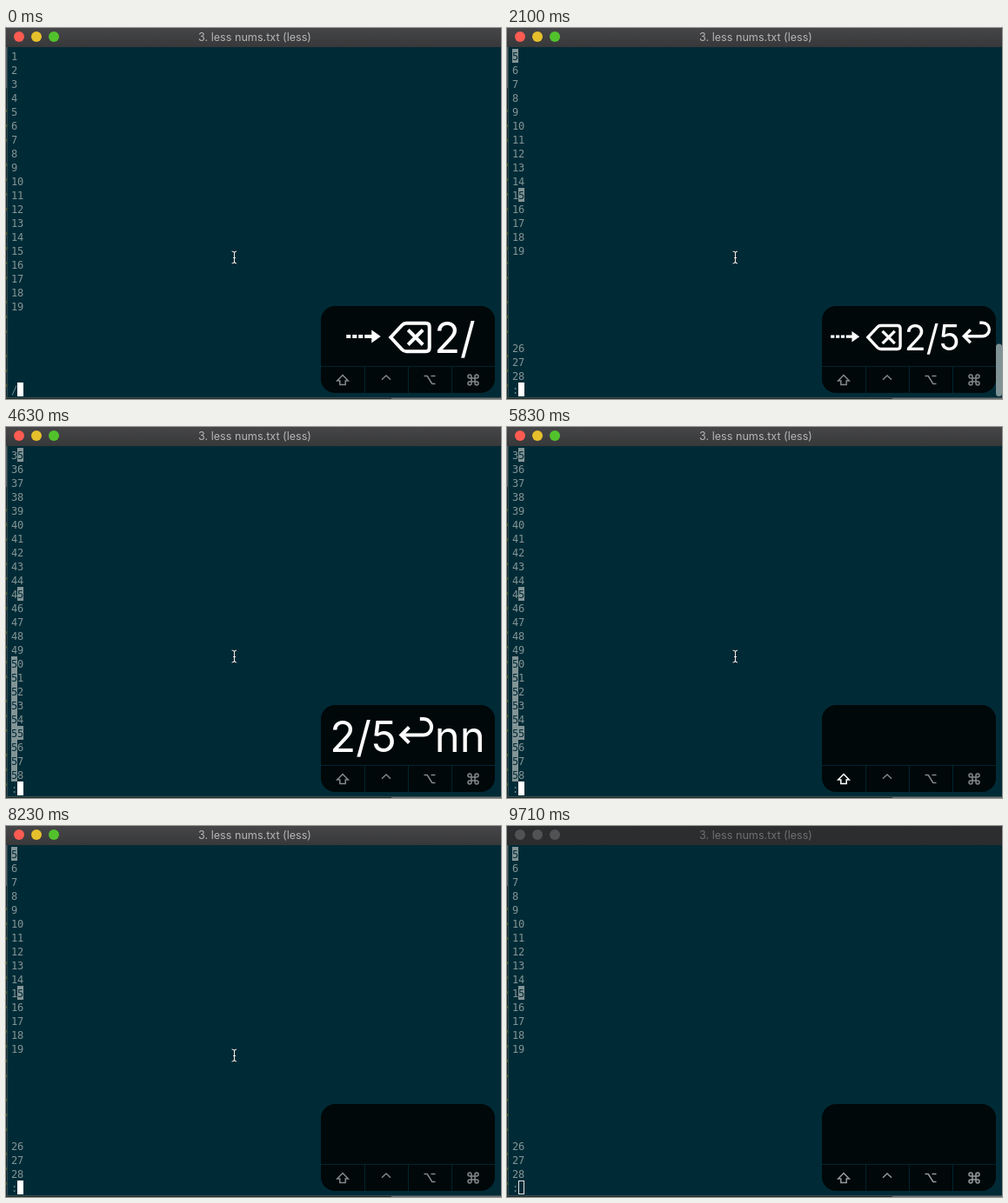
These frames come from a looping animation (569 by 427 pixels, 9810 ms). An HTML page with a canvas:

```html
<!DOCTYPE html>
<html lang="en">
<head>
<meta charset="utf-8">
<title>less nums.txt</title>
<style>
  html, body { margin: 0; width: 100%; height: 100%; overflow: hidden; background: #002b36; }
  canvas { display: block; }
</style>
</head>
<body>
<canvas id="stage" width="569" height="427"></canvas>
<script>
const ctx = document.getElementById('stage').getContext('2d');
const LOOP = 9810, BG = '#002b36', FG = '#839496';
const CELL_W = 7, CELL_H = 16, LEFT = 6, TOP = 24, ROWS = 24;
const KEYS_WIDTH = 192;

// start time, first line shown, prompt, pressed keys ('>' tab, '<' delete, '~' return), shift held
const steps = [
  [0, 1, '/', '><2/', false],
  [1350, 1, '/5', '><2/5', false],
  [2100, 5, ':', '><2/5~', false],
  [3440, 15, ':', '<2/5~n', false],
  [4630, 35, ':', '2/5~nn', false],
  [5830, 35, ':', '', true],
  [6130, 15, ':', 'N', true],
  [7030, 5, ':', 'NN', true],
  [8230, 5, ':', '', false],
];
const pointerStops = [[0, 262.5, 264], [8820, 278.5, 264], [8960, 466.5, 320], [9110, 555.5, 409], [9250, 540.5, 421], [9400, -50, -50]];
const latest = (list, t) => list.filter(item => item[0] <= t).pop();

const modifiers = [
  'M0-5.5L6.3 1H3.2V5.5H-3.2V1H-6.3Z',
  'M-5-.3L0-5L5-.3',
  'M-6.5-4.5H-2.8L2.8 4.5H6.5M1.5-4.5H6.5',
  'M-2-4V4A2 2 0 1 1-4 2H4A2 2 0 1 1 2 4V-4A2 2 0 1 1 4-2H-4A2 2 0 1 1-2-4Z',
].map(d => new Path2D(d));
const tabKey = new Path2D('M8-3h5v4h-5zM15-3h5v4h-5zM22-3h5v4h-5zM29-3h9v4h-9zM37-8.5L47.5-1L37 6.5z');
const deleteKey = new Path2D('M6 0L19-14Q21-16.2 24-16.2H46.5Q50.5-16.2 50.5-12V12Q50.5 16.2 46.5 16.2H24Q21 16.2 19 14ZM26-8.5L43 8.5M43-8.5L26 8.5');
const returnKey = new Path2D('M6-1.5H31A9.2 9.2 0 0 0 31-20H27M14.5-10.5L5.5-1.5L14.5 7.5');
const beam = new Path2D('M-3-7Q0-7 0-4.5V4.5Q0 7-3 7M2.5-7Q0-7 0-4.5M0 4.5Q0 7 2.5 7M-1.5 .5H1.5');

function rect(x, y, w, h, color) {
  ctx.fillStyle = color;
  ctx.fillRect(x, y, w, h);
}

function roundRect(x, y, w, h, r, color) {
  ctx.fillStyle = color;
  ctx.beginPath();
  ctx.roundRect(x, y, w, h, r);
  ctx.fill();
}

function stroke(path, color, width, x = 0, y = 0) {
  ctx.save();
  ctx.translate(x, y);
  ctx.strokeStyle = color;
  ctx.lineWidth = width;
  ctx.stroke(path);
  ctx.restore();
}

function drawWindow(active) {
  rect(0, 0, 569, 427, BG);
  rect(0, 22, 1, 405, '#132c2e');
  rect(0, 22, 1, 47, '#566064');
  for (let y = 86; y < 420; y += 20) rect(0, y + y * 7 % 11, 1, 3, '#4f5a16');
  rect(1, 22, 1, 404, '#31484e');
  rect(0, 425, 569, 1, '#3c4f54');
  rect(0, 426, 443, 1, '#1d2a20');
  rect(443, 426, 126, 1, '#68716f');

  const bar = ctx.createLinearGradient(0, 0, 0, 22);
  bar.addColorStop(0, active ? '#464648' : '#2d2e30');
  bar.addColorStop(1, active ? '#37383a' : '#2b2c2e');
  rect(0, 0, 569, 22, bar);
  ['#fc5b52', '#e6bf2c', '#52c22c'].forEach((color, i) =>
    roundRect(9 + 20 * i, 4, 12, 12, 6, active ? color : '#515254'));
  ctx.font = '12.6px Inter, sans-serif';
  ctx.textAlign = 'center';
  ctx.fillStyle = active ? '#b6b6b8' : '#6f7072';
  ctx.fillText('3. less nums.txt (less)', 286, 15);
}

function drawTerminal(first, prompt, active) {
  ctx.font = '12px "DejaVu Sans Mono", monospace';
  ctx.textAlign = 'left';
  const put = (char, col, row, color) => {
    ctx.fillStyle = color;
    ctx.fillText(char, LEFT + col * CELL_W, TOP + row * CELL_H + 13);
  };
  for (let row = 0; row < ROWS; row++) {
    const n = first + row;
    if (n > 19 && n < 26) continue; // blank lines in the file
    [...String(n)].forEach((char, col) => {
      const hit = char === '5' && prompt === ':';
      if (hit) rect(LEFT + col * CELL_W, TOP + row * CELL_H, CELL_W, CELL_H, FG);
      put(char, col, row, hit ? BG : FG);
    });
  }
  [...prompt].forEach((char, col) => put(char, col, ROWS, '#6f878a'));
  const x = LEFT + prompt.length * CELL_W, y = TOP + ROWS * CELL_H;
  if (active) return rect(x, y, CELL_W, CELL_H, '#fff');
  ctx.strokeStyle = '#dfe4e5';
  ctx.lineWidth = 1;
  ctx.strokeRect(x + .5, y + .5, CELL_W - 1, CELL_H - 1);
}

function drawKey(key) {
  if (key === '>') ctx.fill(tabKey);
  else if (key === '<') stroke(deleteKey, '#fff', 4);
  else if (key === '~') stroke(returnKey, '#fff', 4);
  else ctx.fillText(key, 0, 18);
}

// A slight overflow condenses the first key; a larger one shrinks the whole row.
function drawKeys(keys) {
  ctx.font = '49px Inter, sans-serif';
  ctx.textAlign = 'left';
  ctx.fillStyle = '#fff';
  const symbolWidth = { '>': 53, '<': 56, '~': 44 };
  const widths = [...keys].map(key => symbolWidth[key] || ctx.measureText(key).width);
  const total = widths.reduce((sum, w) => sum + w, 0);
  const excess = Math.max(0, total - KEYS_WIDTH);
  const shrink = excess > KEYS_WIDTH * .1;
  const scale = shrink ? KEYS_WIDTH / total : 1;
  const condense = shrink ? 1 : 1 - excess / widths[0];
  ctx.save();
  ctx.translate(461.5 - Math.min(total, KEYS_WIDTH) / 2, 356);
  ctx.scale(scale, scale);
  [...keys].forEach((key, i) => {
    const squeeze = i ? 1 : condense;
    ctx.save();
    ctx.scale(squeeze, 1);
    drawKey(key);
    ctx.restore();
    ctx.translate(widths[i] * squeeze, 0);
  });
  ctx.restore();
}

function drawOverlay(keys, shift, active) {
  roundRect(362, 320, 200, 100, 16, '#00080a');
  rect(362, 389, 200, 1, '#00252e');
  for (const x of [412, 462, 512]) rect(x, 390, 1, 30, '#00252e');
  modifiers.forEach((path, i) => {
    const color = shift && i === 0 ? '#fff' : active ? '#83888a' : '#969a9b';
    stroke(path, color, 1.5, 387 + 50 * i, 405);
  });
  drawKeys(keys);
}

function draw(t) {
  const [, first, prompt, keys, shift] = latest(steps, t);
  const active = t < 9710;
  drawWindow(active);
  drawTerminal(first, prompt, active);
  if (t >= 2100 && t < 2850) {
    ctx.globalAlpha = t < 2700 ? 1 : .45;
    roundRect(562, 363.5, 7, 60.5, 3.5, '#7f9296');
    ctx.globalAlpha = 1;
  }
  drawOverlay(keys, shift, active);
  const [, x, y] = latest(pointerStops, t);
  stroke(beam, '#00141a', 2.6, x, y);
  stroke(beam, '#e4e9ea', 1.2, x, y);
}

function tick() {
  draw(performance.now() % LOOP);
  requestAnimationFrame(tick);
}
tick();
</script>
</body>
</html>
```
